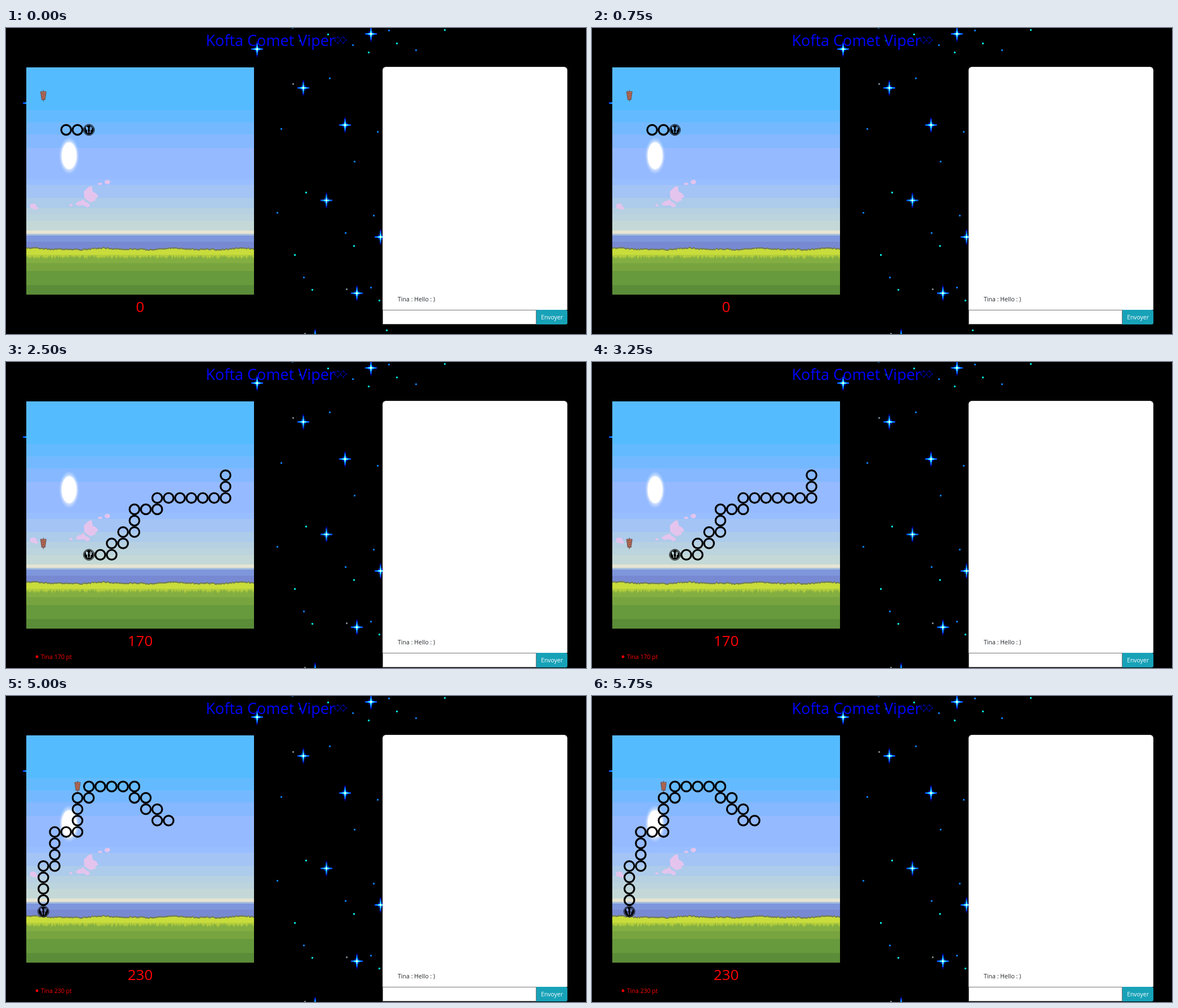
Animation of 1029x544 px, one loop 6250 ms. Source, as an HTML page with a canvas:

```html
<!DOCTYPE html>
<html lang="fr">
<head>
<meta charset="utf-8">
<title>Kofta Comet Viper</title>
<style>
  html, body { margin: 0; width: 100%; height: 100%; overflow: hidden; background: #000; }
  canvas { display: block; }
</style>
</head>
<body>
<canvas id="stage" width="1029" height="544"></canvas>
<script>
const ctx = document.getElementById('stage').getContext('2d');
const FONT = '"Open Sans", "Noto Sans", sans-serif';
const HOLD = 1250;
const BOARD = { x: 36, y: 70, size: 404 };
const CELL = BOARD.size / 20;
const PLAYER = 'Tina';

// head cell, body runs from head to tail, food cell, score
const scenes = [
  { head: [5, 5], body: 'L2', food: [1, 2], score: 0 },
  { head: [14, 2], body: 'R3D6', food: [12, 2], score: 70 },
  { head: [5, 13], body: 'R2U1R1U1R1U2R2U1R6U2', food: [1, 12], score: 170 },
  { head: [6, 11], body: 'U4R2U3R2U4L3D3', food: [6, 12], score: 190 },
  { head: [1, 15], body: 'U4R1U3R2U3R1U1R4D1R1D1R1D1R1', food: [4, 4], score: 230 }
];
const STEP = { L: [-1, 0], R: [1, 0], U: [0, -1], D: [0, 1] };

function rect(x, y, w, h, color) {
  ctx.fillStyle = color;
  ctx.fillRect(x, y, w, h);
}

function text(str, x, y, size, color, align = 'left') {
  ctx.font = `${size}px ${FONT}`;
  ctx.textAlign = align;
  ctx.fillStyle = color;
  ctx.fillText(str, x, y);
}

function ellipse(x, y, rx, ry, color) {
  ctx.fillStyle = color;
  ctx.beginPath();
  ctx.ellipse(x, y, rx, ry, 0, 0, Math.PI * 2);
  ctx.fill();
}

function rounded(x, y, w, h, radii, color) {
  ctx.fillStyle = color;
  ctx.beginPath();
  ctx.roundRect(x, y, w, h, radii);
  ctx.fill();
}

function polygon(points, color) {
  ctx.fillStyle = color;
  ctx.beginPath();
  for (const [x, y] of points) ctx.lineTo(x, y);
  ctx.fill();
}

// repeatable noise in 0..1
function noise(n) {
  const v = Math.sin(n * 127.1) * 43758.5453;
  return v - Math.floor(v);
}

function bigStar(cx, cy) {
  const u = 3;
  const px = (dx, dy, color) =>
    rect(Math.round(cx - 1.5 + dx * u), Math.round(cy - 1.5 + dy * u), u, u, color);
  const rays = ['#3cf4ff', '#0a8cff', '#0648e8', '#000084'];
  for (const s of [-1, 1]) {
    for (const t of [-1, 1]) px(s, t, '#0000a0');
    for (let i = 1; i <= 4; i++) {
      px(0, s * i, rays[i - 1]);
      if (i < 4) px(s * i, 0, rays[i - 1]);
    }
  }
  px(0, 0, '#f0ffff');
}

// dim diamond of square dots
function dimStar(cx, cy) {
  for (const s of [-1, 1]) {
    rect(cx - 1, cy - 1 + s * 5, 3, 3, '#000080');
    rect(cx - 1 + s * 5, cy - 1, 3, 3, '#000080');
    for (const t of [-1, 1]) rect(cx - 1 + s * 3, cy - 1 + t * 3, 2, 2, '#000080');
  }
}

function space() {
  rect(0, 0, 1029, 544, '#000');
  const big = [[445, 37], [647, 10], [527, 106], [601, 172], [568, 306],
    [664, 371], [622, 471], [548, 548], [40, 133]];
  big.forEach(([x, y]) => bigStar(x, y));
  const small = {
    '#0878e8': [[508, -1], [615, 30], [679, 4], [727, 39], [574, 89], [488, 179], [659, 184],
      [618, 237], [481, 328], [652, 333], [602, 364], [528, 443], [647, 461]],
    '#00e6dc': [[522, 22], [571, 11], [643, 43], [693, 27], [778, 3], [532, 292], [617, 387],
      [512, 403], [543, 465], [662, 484], [675, 537]],
    '#707c84': [[509, 99], [604, 464], [530, 543]]
  };
  for (const color in small)
    small[color].forEach(([x, y]) => rect(x - 1, y - 1, 3, 3, color));
  dimStar(588, 21);
  dimStar(598, 21);
}

function puff(cx, cy, rx, ry, seed) {
  const points = [];
  for (let i = 0; i < 18; i++) {
    const a = i / 18 * Math.PI * 2, r = 0.82 + noise(seed + i) * 0.3;
    points.push([cx + Math.cos(a) * rx * r, cy + Math.sin(a) * ry * r]);
  }
  polygon(points, '#e4c4ed');
}

function clouds() {
  polygon([[146, 283], [152, 281], [154, 291], [160, 294], [164, 300], [158, 303],
    [160, 306], [150, 310], [144, 306], [139, 302], [138, 291]], '#e4c4ed');
  polygon([[123, 313], [129, 308], [134, 307], [137, 304], [141, 309], [147, 312],
    [149, 317], [144, 319], [138, 315], [128, 316]], '#e4c4ed');
  puff(115, 315, 3, 2, 14);
  puff(167, 277, 4, 2, 40);
  puff(180, 274, 5, 4, 51);
  puff(48, 317, 6, 5, 63);
  puff(53, 320, 4, 3, 77);
}

function grassEdge(base, rough, bottom, color) {
  const right = BOARD.x + BOARD.size;
  const points = [[BOARD.x, bottom]];
  for (let x = BOARD.x; x <= right; x += 2) {
    const a = (x - 51) / 124 * Math.PI * 2;
    const hill = Math.cos(a) + 0.5 * Math.cos(a * 2 + 0.6);
    points.push([x, base - 1.2 * hill + (noise(x) - 0.5) * rough]);
  }
  points.push([right, bottom]);
  polygon(points, color);
}

function landscape() {
  const bands = [[70, '#55bbff'], [146, '#64baff'], [168, '#74b9ff'], [189, '#85b8ff'],
    [213, '#95baff'], [268, '#99beff'], [279, '#a3c4f5'], [302, '#adcbea'], [320, '#b7d1e2'],
    [331, '#bcd4dd'], [343, '#c4d9d7'], [360, '#e6e4d2'], [366, '#a7bedd'], [369, '#7e96dc'],
    [380, '#7789d2'], [402, '#83ae41'], [418, '#78a440'], [432, '#67993d'], [457, '#5b8c38']];
  const end = BOARD.y + BOARD.size;
  bands.forEach(([y, color], i) => {
    const next = i + 1 < bands.length ? bands[i + 1][0] : end;
    rect(BOARD.x, y, BOARD.size, next - y, color);
  });

  for (let i = 0; i < 3; i++)
    ellipse(112, 227, 17.5 - i * 1.4, 32.5 - i * 3, `rgba(255,255,255,${0.12 + i * 0.1})`);
  ellipse(112, 227, 13.3, 24, '#fff');
  clouds();

  grassEdge(391.8, 2.4, 397, '#707a50');
  grassEdge(394, 2.4, 403, '#c8dc3b');
  for (let x = BOARD.x; x < BOARD.x + BOARD.size; x += 2) {
    const blade = 1 + noise(x + 7) * 5;
    rect(x, 403, 2, blade, '#b4ce3b');
    rect(x, 403 + blade, 2, 2, '#98bb3e');
  }
}

function at([col, row], draw) {
  ctx.save();
  ctx.translate(BOARD.x + (col + 0.5) * CELL, BOARD.y + (row + 0.5) * CELL);
  draw();
  ctx.restore();
}

function ring(r, width) {
  ctx.strokeStyle = '#000';
  ctx.lineWidth = width;
  ctx.beginPath();
  ctx.arc(0, 0, r, 0, Math.PI * 2);
  ctx.stroke();
}

// disc with spoon and fork cut out
function headShape() {
  const disc = new Path2D(), spoon = new Path2D(), fork = new Path2D();
  disc.arc(0, 0, 8.6, 0, Math.PI * 2);
  spoon.ellipse(0, -3, 2, 3, 0, 0, Math.PI * 2);
  spoon.rect(-0.7, 0, 1.4, 5.8);
  for (let i = 0; i < 3; i++) fork.rect(-2 + i * 1.5, -5.8, 1, 3.8);
  fork.rect(-2, -2, 4, 1.6);
  fork.rect(-0.7, -0.4, 1.4, 6.2);
  disc.addPath(spoon, new DOMMatrix().translate(-2.9, 0).rotate(-12));
  disc.addPath(fork, new DOMMatrix().translate(2.9, 0).rotate(12));
  return disc;
}
const HEAD = headShape();

function kebab() {
  rect(-0.6, -10, 1.2, 20, '#5b5050');
  polygon([[-5, -7.5], [5, -7.5], [3, 7], [-3, 7]], '#c46a52');
  ctx.closePath();
  ctx.strokeStyle = '#60504e';
  ctx.lineWidth = 0.9;
  ctx.stroke();
  ctx.beginPath();
  for (let i = 0; i < 4; i++) {
    const y = -4.5 + i * 3.2, w = 4.4 - i * 0.5;
    ctx.moveTo(-w, y - 0.8);
    ctx.lineTo(w, y + 0.8);
  }
  ctx.stroke();
}

function snake({ head, body }) {
  const cell = [...head];
  for (const [, dir, count] of body.matchAll(/([LRUD])(\d+)/g)) {
    for (let i = 0; i < +count; i++) {
      cell[0] += STEP[dir][0];
      cell[1] += STEP[dir][1];
      at(cell, () => ring(8.7, 3.2));
    }
  }
  at(head, () => {
    ring(9.8, 1);
    ctx.fillStyle = '#000';
    ctx.fill(HEAD, 'evenodd');
  });
}

function chat(shift) {
  const top = 501 + shift, height = 26;
  rounded(668, 69, 328, top - 69, [6, 6, 0, 0], '#dfdfdf');
  rounded(669, 70, 326, top - 70, [5, 5, 0, 0], '#fff');
  text(`${PLAYER} : Hello : )`, 695, 486 + shift, 10.6, '#212529');
  rect(668, top, 273, height, '#767676');
  rect(669, top + 1, 271, height - 2, '#fff');
  rounded(941, top, 55, height, [0, 3, 3, 0], '#17a2b8');
  text('Envoyer', 968.5, top + 17, 10.4, '#fff', 'center');
}

function render(now) {
  const scene = scenes[Math.floor(now / HOLD) % scenes.length];
  const started = scene.score > 0;
  space();
  text('Kofta Comet Viper', 354.5, 32, 27, '#00f');
  landscape();
  at(scene.food, kebab);
  snake(scene);
  text(scene.score, 238, 505, 26, '#f00', 'center');
  if (started) {
    ellipse(55, 524, 2.4, 2.4, '#f00');
    text(`${PLAYER} ${scene.score} pt`, 62, 528, 10.6, '#f00');
  }
  chat(started ? 16 : 0);
}

const start = performance.now();
function tick() {
  render(performance.now() - start);
  requestAnimationFrame(tick);
}
tick();
</script>
</body>
</html>
```
